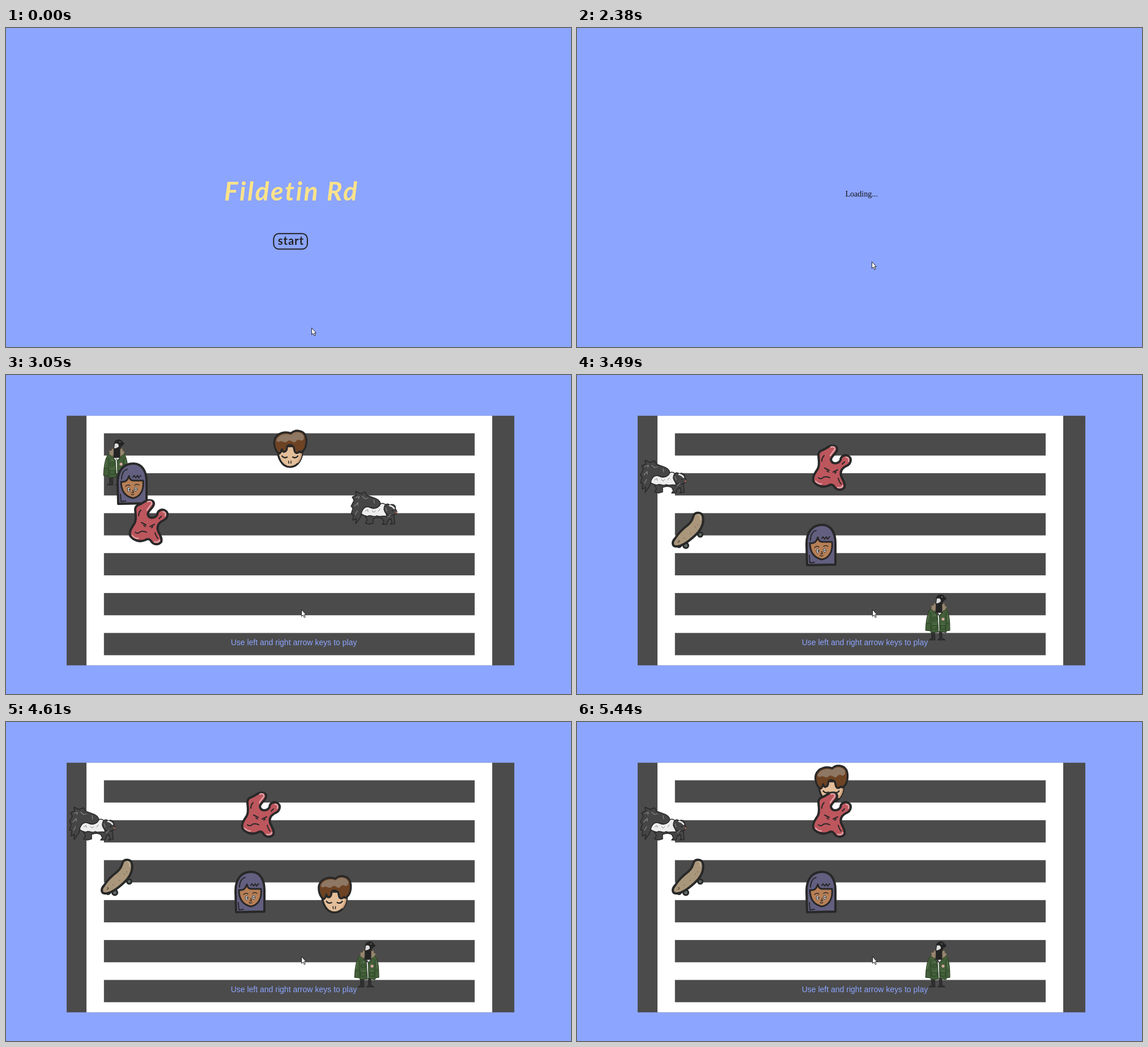
Write an HTML page that moves like this. It is 997x562 px and loops after 5.7 s.

```html
<!DOCTYPE html>
<html lang="en">
<head>
<meta charset="utf-8">
<title>Crosswalk game</title>
<style>
html, body { margin: 0; width: 100%; height: 100%; overflow: hidden; background: #8ca5ff; }
svg { display: block; width: 100vw; height: 100vh; }
.ink { stroke: #282828; stroke-linecap: round; stroke-linejoin: round; }
.line { fill: none; }
#title { font: italic 700 46px Lato, sans-serif; letter-spacing: 2.7px; fill: #ffe38a; }
#start { fill: none; stroke: #222; stroke-width: 2; }
#start text { font: 700 20px Lato, sans-serif; letter-spacing: 1px; fill: #222; stroke: none; }
#start.hover { stroke: #ffe38a; }
#start.hover text { fill: #ffe38a; }
#loading { font: 14px "Liberation Serif", serif; fill: #111; }
#hint { font: 14px "Liberation Sans", sans-serif; fill: #8ca5ff; }
</style>
</head>
<body>
<svg viewBox="0 0 997 562" preserveAspectRatio="none">
  <defs><clipPath id="view"><rect x="107" y="71.700" width="790" height="439.700"/></clipPath></defs>
  <rect width="997" height="562" fill="#8ca5ff"/>

  <g id="menu">
    <text id="title" x="503.800" y="304" text-anchor="middle">Fildetin Rd</text>
    <g id="start">
      <rect x="472.300" y="362.300" width="59.500" height="27.200" rx="9"/>
      <text x="502.800" y="382" text-anchor="middle">start</text>
    </g>
  </g>
  <text id="loading" x="473.500" y="296.500">Loading...</text>

  <g id="game" clip-path="url(#view)">
    <rect x="107" y="71" width="790" height="441" fill="#4b4b4b"/>
    <rect x="142" y="71" width="716" height="441" fill="#fff"/>
    <g id="stripes" fill="#4b4b4b"></g>
    <text id="hint" x="396.700" y="476">Use left and right arrow keys to play</text>

    <g id="head" class="ink" stroke-width="3.400">
      <path fill="#e3be99" d="M8 30C7 52 17 66.500 30 66.500C44 66.500 54 52 52 30Z"/>
      <path class="line" stroke="#cfa27d" stroke-width="3" d="M44 58C48 53 50 47 50 41"/>
      <path fill="#6d4324" d="M11 43C3 38 1 25 3 18C7 6 22 3 32 7C38 0 52 1 57 10C61 20 59 34 52 39C51 42 49 41 47 39C45 42 41 43 39 40C37 37 38 33 36 30C32 27 28 27 25 30C25 36 23 40 19 40C17 39 16 37 16 35C15 38 14 42 11 43Z"/>
      <path fill="#8e7763" stroke="none" d="M6 19C10 9 23 6 32 10C38 3 50 4 54 11C56 16 54 20 49 20C44 17 42 19 39 23C34 24 31 17 26 21C21 26 17 20 13 21C10 23 7 23 6 19Z"/>
      <path class="line" stroke-width="2.300" d="M16 47Q20 52 25 49M35 49Q40 52 44 47"/>
      <path class="line" stroke-width="1.500" d="M27.500 56l.5 4M32 56l-.3 4"/>
    </g>

    <g id="goose" class="ink" stroke-width="1">
      <path fill="#303030" d="M182 179L183 190L178 194H189L188 179ZM196 179L197 190L193 194H207L201 190L201 179Z"/>
      <path fill="#eee" d="M189 136H204L198 154Z"/>
      <path fill="#95866f" stroke="#5f5444" d="M193 131L186 129L187 132L181 134L183 137L179 141L192 146L193 136ZM200 131L206 129L206 133L210 136L208 138L212 141L200 146Z"/>
      <path fill="#242424" d="M190 145L191 121C191 113 203 112 205 117L209 121L203 126L201 130L201 145Z"/>
      <path fill="#ddd" stroke="none" d="M192 121Q199 119 199 126Q195 130 191 129Z"/>
      <circle cx="201" cy="118" r="1" fill="#888" stroke="none"/>
      <path fill="#435f3a" stroke="#26381f" d="M181 139C175 146 173 158 172 177L181 178L182 181L195 180L193 150ZM209 139C214 148 215 159 215 177L209 178L208 181L197 179L196 151Z"/>
      <path class="line" stroke="#2b4425" d="M181 146V178M208 146V178M184 155H192V159H184ZM183 168H192V175H183ZM199 168H207V175H199ZM174 165H180M209 165H214M188 142L193 153M204 142L197 153"/>
      <path class="line" stroke="#66825a" d="M177 151L175 161M186 150H190M185 166H191M200 166H206M211 150L212 160"/>
      <circle cx="203" cy="157" r="2.600" fill="#d7a7a0" stroke="none"/>
    </g>

    <g id="girl" class="ink" stroke-width="4">
      <path fill="#625f80" d="M198 227L197 190C197 167 208 156 225 156C241 156 248 171 248 188L248 226Z"/>
      <path fill="#b77f56" stroke-width="3" d="M203 188C210 189 214 187 217 178C218 184 221 186 225 186L242 186C244 204 236 215 224 217C211 214 203 205 203 188Z"/>
      <path class="line" stroke-width="2" d="M204 183C204 174 208 167 214 166M224 180L226 177L229 181L232 177L234 181L238 177M202 210L203 223L211 222"/>
      <path class="line" stroke-width="1.400" d="M211 196Q215 192 219 195M227 194Q231 191 235 194M224 203L225 207L222 207M221 210Q223 212 226 210"/>
      <g fill="#eee" stroke-width="1"><ellipse cx="216.500" cy="202" rx="2.300" ry="3.700"/><ellipse cx="229" cy="201" rx="2.300" ry="3.700"/></g>
      <path stroke-width="1.400" d="M217 201v2M229 200v2"/>
    </g>

    <g id="blob" class="ink" stroke-width="4">
      <path fill="#bd565d" d="M228 236C229 228 237 229 243 224C250 219 261 219 261 227C260 235 251 238 250 245C252 254 263 253 267 246C267 239 275 235 281 239C288 243 285 253 278 256C269 260 266 266 268 274C271 281 276 287 274 294C269 300 261 299 257 294C253 287 249 289 245 291C236 295 224 291 219 283C217 275 222 269 227 261C231 253 228 245 228 236Z"/>
      <path class="line" stroke="#e1a0a4" stroke-width="2.500" d="M250 223Q258 221 257 227Q253 232 249 238M277 241Q283 241 281 248M262 294Q269 296 271 291M223 283Q227 288 233 288"/>
      <path class="line" stroke-width="2" d="M234 248Q234 242 238 238M239 260L247 264M262 263L254 267M243 265l3 2M257 269l2-2M228 277Q233 281 237 276Q243 274 248 277M274 249L270 253M263 278Q265 285 268 288"/>
    </g>

    <g id="skunk" class="ink" stroke-width="1.500">
      <path fill="#454545" d="M632 245C633 251 637 251 637 256L634 261L641 263L648 261L648 253C655 250 660 251 664 253L667 259L664 263H672L674 256L679 253L681 260L678 263L686 262L685 248L674 238Z"/>
      <path fill="#eee" d="M626 243C629 232 636 229 644 234C651 237 657 232 660 227C667 225 672 228 670 234C667 240 673 245 671 249C664 247 660 251 654 248C648 252 644 245 638 249C632 248 628 246 626 243Z"/>
      <path fill="#454545" d="M617 262L618 253L612 256L613 246L609 245L612 235L609 231L614 221L611 215L618 212L617 205L626 209L634 206L637 212L648 216C655 218 660 222 661 227C657 236 650 236 642 233C632 229 627 240 627 246C625 253 621 257 617 262Z"/>
      <path fill="#454545" d="M667 237C667 228 672 225 678 229C684 226 688 231 687 235L690 241Q688 247 681 247C674 249 669 244 667 237Z"/>
      <path class="line" stroke="#eee" stroke-width="2.500" d="M677 230Q682 231 685 235"/>
      <path class="line" stroke="#888" stroke-width="1.200" d="M617 216L623 214L622 218M615 231L621 225L621 230M616 246L620 239M629 214L634 218L639 217M649 220L650 226M674 250L679 246M670 234L672 240"/>
      <path class="line" stroke="#888" stroke-width="1" d="M634 240l4-3 1 4M646 239l3 3 3-3M660 236l-3 4"/>
      <circle cx="688.500" cy="242" r="1.800" fill="#a06555" stroke="none"/>
      <circle cx="682" cy="239" r="1" fill="#111" stroke="none"/>
    </g>

    <g id="board" class="ink" stroke-width="3">
      <g fill="#606a64"><circle cx="217.500" cy="281" r="4"/><circle cx="192" cy="300.500" r="4.500"/><circle cx="180" cy="300" r="3.500"/></g>
      <path fill="#a9967b" stroke-width="4" d="M206 247C209 241 220 241 222 249C225 262 218 274 207 284C196 294 184 303 174 302C167 301 168 293 173 288C178 280 188 270 196 264C203 258 204 253 206 247Z"/>
      <path class="line" stroke="#c5b69d" stroke-width="2" d="M214 246Q219 246 218 254"/>
      <path class="line" stroke="#625441" stroke-width="1.500" d="M213 264h.1M209 268h.1M200 279h.1M179 291l2 2M180 294l-2 1M189 287h.1"/>
    </g>
  </g>

  <path id="cursor" fill="#fff" stroke="#111" stroke-width=".9" stroke-linejoin="round" d="M0 0V11.800L2.700 9.400L4.700 13.800L6.600 13L4.700 8.700H8Z"/>
</svg>
<script>
const LOOP = 5700, CLICK = 1650, PLAY = 2500, RESPAWN = 3490;
const TICK = 130, WRAP = 600;
const $ = id => document.getElementById(id);

// Turning points [time, x, y]; y keeps rising and is wrapped when drawn
const route = [
  [PLAY, 471, 250], [3200, 471, 57], [3750, 378, -92], [4490, 576, -299],
  [4730, 523, -363], [5170, 419, -473], [5440, 418.5, -525.5]
];
const jumps = { goose: [443, 273], girl: [208, 108], blob: [198, -96], skunk: [-497, -55] };

const easeOut = f => 1 - (1 - f) ** 1.7;
const easeInOut = f => f ** 3 / (f ** 3 + (1 - f) ** 3);
const show = (id, on) => $(id).setAttribute("visibility", on ? "visible" : "hidden");
const place = (id, [x, y]) => $(id).setAttribute("transform", `translate(${x} ${y})`);

// Moves from one point to the next in equal ticks
function glide(t, [t0, x0, y0], [t1, x1, y1], ease = f => f) {
  const n = Math.round((t1 - t0) / TICK);
  const f = ease(Math.min(1, Math.max(0, Math.floor(n * (t - t0) / (t1 - t0) + 0.1) / n)));
  return [x0 + (x1 - x0) * f, y0 + (y1 - y0) * f];
}

function cursorAt(t) {
  const button = [487.4, 366.4];
  return t < CLICK
    ? glide(t, [0, 539.4, 528.5], [750, ...button], easeOut)
    : glide(t, [1960, ...button], [PLAY, 521.5, 413.5], easeInOut);
}

function headAt(t) {
  const next = route.findIndex(p => p[0] > t);
  const i = next < 0 ? route.length - 1 : Math.max(1, next);
  const [x, y] = glide(t, route[i - 1], route[i]);
  return [x, y < -80 ? y + WRAP : y];
}

for (let i = 0; i < 6; i++) {
  const r = document.createElementNS("http://www.w3.org/2000/svg", "rect");
  const box = { x: 172.8, y: 102.7 + i * 70.35, width: 654.2, height: 39.2 };
  for (const k in box) r.setAttribute(k, box[k]);
  $("stripes").append(r);
}

function draw(t) {
  show("menu", t < CLICK);
  show("loading", t >= CLICK && t < PLAY);
  show("game", t >= PLAY);
  show("board", t >= RESPAWN);

  const cursor = cursorAt(t);
  $("start").classList.toggle("hover", cursor[1] < 390);
  place("cursor", cursor);
  place("head", headAt(t));
  for (const id in jumps) place(id, t < RESPAWN ? [0, 0] : jumps[id]);
}

const begin = performance.now();
function tick() {
  draw((performance.now() - begin) % LOOP);
  requestAnimationFrame(tick);
}
tick();
</script>
</body>
</html>
```
